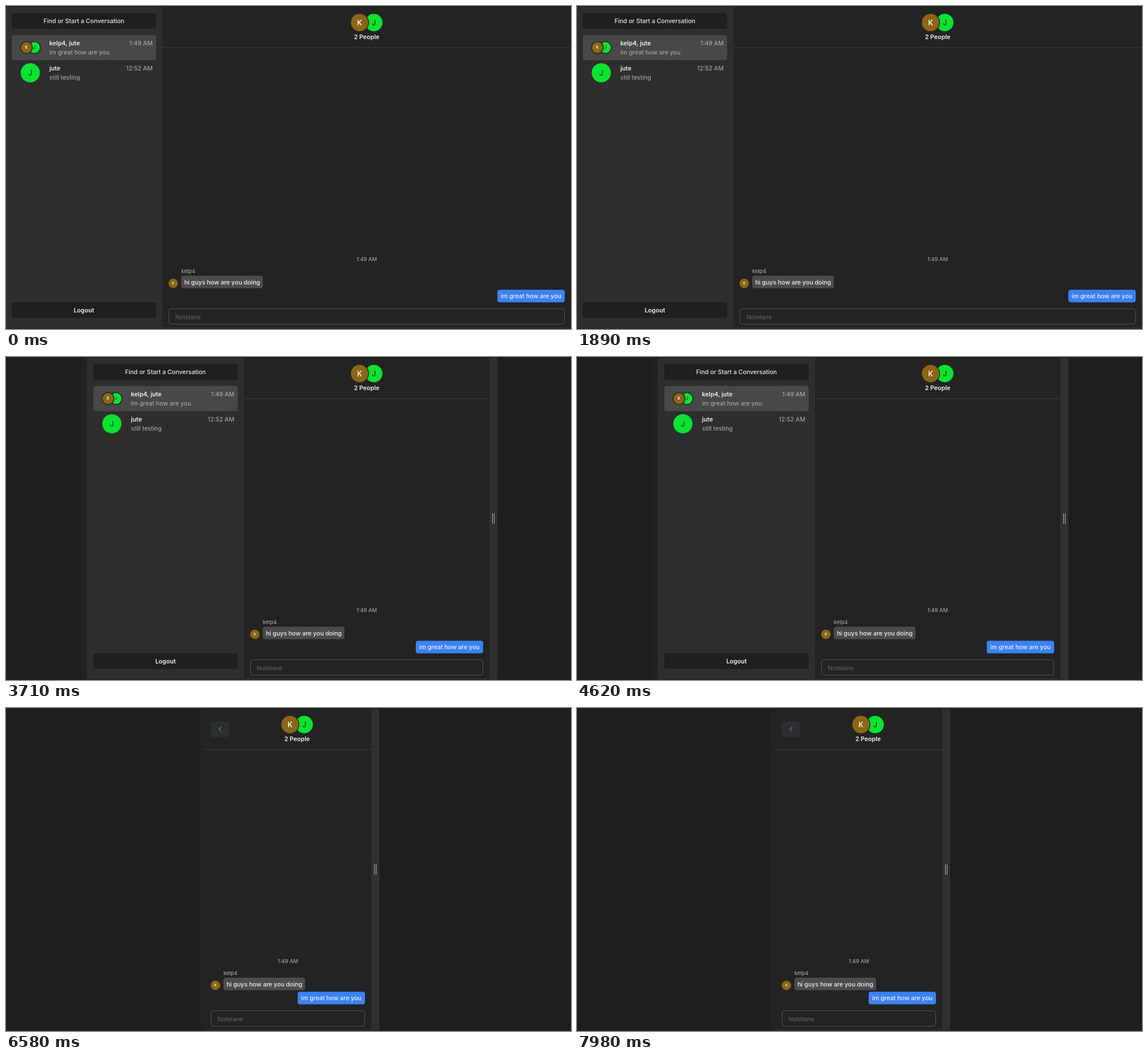
Animation, 990 px wide and 566 px high, one loop 8000 ms. Source, as an HTML page with a canvas:

```html
<!DOCTYPE html>
<html lang="en">
<head>
<meta charset="utf-8">
<title>Responsive chat</title>
<style>
  html, body { margin: 0; width: 100%; height: 100%; overflow: hidden; background: #1e1e20; }
  canvas { display: block; width: 990px; height: 566px; }
</style>
</head>
<body>
<canvas id="stage" width="990" height="566"></canvas>
<script>
const ctx = document.getElementById('stage').getContext('2d');
const W = 990, H = 566, LOOP = 8000, SIZE = 10.6;
const BROWN = '#8b6616', GREEN = '#0be331', BLUE = '#3b82f6';
const CHAT = '#232323', PANEL = '#2e2e2e', BUTTON = '#1f1f1f';
const USER = 'kelp4', FRIEND = 'jute';

// Each layout: start time, sidebar left, chat left, chat right
const layouts = [
  { at: 0, side: -1, left: 274, right: 990 },
  { at: 3220, side: 142, left: 417, right: 847, framed: true },
  { at: 4830, side: 230, left: 468, right: 759, framed: true },
  { at: 6580, side: 348, left: 348, right: 640, framed: true, compact: true }
];

function rect(x, y, w, h, color) {
  ctx.fillStyle = color;
  ctx.fillRect(x, y, w, h);
}

function box(x, y, w, h, color, radius = 4) {
  ctx.beginPath();
  ctx.roundRect(x, y, w, h, radius);
  ctx.fillStyle = color;
  ctx.fill();
}

function disc(x, y, r, color) {
  ctx.beginPath();
  ctx.arc(x, y, r, 0, Math.PI * 2);
  ctx.fillStyle = color;
  ctx.fill();
}

// y is the middle of the capitals
function text(str, x, y, { color = '#f2f2f2', size = SIZE, weight = 400, align = 'left' } = {}) {
  ctx.font = `${weight} ${size}px Inter, Roboto, sans-serif`;
  ctx.textAlign = align;
  ctx.fillStyle = color;
  ctx.fillText(str, x, y + size * 0.364);
}

function avatar(letter, x, y, r, size, weight = 500) {
  const user = letter === 'K';
  disc(x, y, r, user ? BROWN : GREEN);
  text(letter, x, y, { color: user ? '#fff' : '#123d18', size, weight, align: 'center' });
}

function pair(x, y, gap, r, size) {
  for (const [letter, dx] of [['J', gap], ['K', -gap]]) {
    disc(x + dx, y, r + 1.4, CHAT);
    avatar(letter, x + dx, y, r, size);
  }
}

function row(x, w, y, name, preview, time) {
  const tx = x + w * 0.25 + 2.8;
  text(name, tx, y + 14, { weight: 600 });
  text(preview, tx, y + 30.5, { color: '#b3b3b3' });
  text(time, x + w - 6, y + 14, { color: '#b3b3b3', align: 'right' });
}

function sidebar({ side, left }) {
  const x = side + 11, w = left - side - 22, mid = x + w / 2;
  const face = x + w * 0.125 + 0.9;
  rect(side, 1.5, left - side, H, PANEL);

  box(x, 12.5, w, 27.5, BUTTON);
  text('Find or Start a Conversation', mid, 26.5, { color: '#e8e8e8', weight: 500, align: 'center' });

  box(x, 51, w, 44, '#484848');
  pair(face + 0.2, 72.8, 7, 9.7, 7);
  row(x, w, 51, `${USER}, ${FRIEND}`, 'im great how are you', '1:49 AM');

  avatar('J', face, 117, 16.8, 12.5, 400);
  row(x, w, 95, FRIEND, 'still testing', '12:52 AM');

  box(x, 519, w, 27.5, BUTTON);
  text('Logout', mid, 532.7, { weight: 600, align: 'center' });
}

function header({ left, right, compact }) {
  const mid = (left + right) / 2 + (compact ? 16 : 0);
  pair(mid, 29, 12.5, 15.2, 12.5);
  text('2 People', mid, 54, { weight: 600, align: 'center' });
  rect(left, 72.5, right - left, 1, '#404040');
  if (!compact) return;

  box(left + 11, 23.5, 31.5, 27.5, PANEL);
  ctx.beginPath();
  ctx.moveTo(left + 29.3, 33.2);
  ctx.lineTo(left + 25.2, 37.3);
  ctx.lineTo(left + 29.3, 41.4);
  ctx.strokeStyle = BLUE;
  ctx.lineWidth = 1.3;
  ctx.stroke();
}

function messages({ left, right }) {
  const mid = (left + right) / 2, bx = left + 33, end = right - 11;
  text('1:49 AM', mid, 443.5, { color: '#b3b3b3', size: 9.4, align: 'center' });
  text(USER, bx, 464.8, { color: '#b3b3b3', size: 9.4 });
  avatar('K', left + 19, 486, 8.3, 6);

  box(bx, 472.5, 143, 22, '#4c4c4c');
  text('hi guys how are you doing', bx + 5.5, 483.7, { weight: 500 });
  box(end - 118, 497.3, 118, 22, BLUE);
  text('im great how are you', end - 59, 508.5, { weight: 500, align: 'center' });

  ctx.beginPath();
  ctx.roundRect(left + 11.5, 530.5, right - left - 23, 27, 4);
  ctx.strokeStyle = '#535353';
  ctx.lineWidth = 1;
  ctx.stroke();
  text('Notelane', left + 22.5, 544.7, { color: '#676767' });
}

function frame({ side, right }) {
  box(side - 9, 1.5, right - side + 9, H - 2, '#222223', [8, 0, 0, 8]);
  rect(right, 1.5, 14, H, '#303030');
  rect(right + 5, 274, 1, 18, '#b5b5b5');
  rect(right + 8, 274, 1, 18, '#b5b5b5');
}

function draw(now) {
  const t = now % LOOP;
  const view = layouts.findLast(l => t >= l.at);
  rect(0, 0, W, H, '#1e1e20');
  if (view.framed) frame(view);
  rect(view.left, 1.5, view.right - view.left, H, CHAT);
  rect(view.left, 563, view.right - view.left, 2, PANEL);
  if (!view.compact) sidebar(view);
  header(view);
  messages(view);
  rect(0, 565, W, 1, '#251f21');
}

const start = performance.now();
function tick() {
  draw(performance.now() - start);
  requestAnimationFrame(tick);
}
tick();
</script>
</body>
</html>
```
